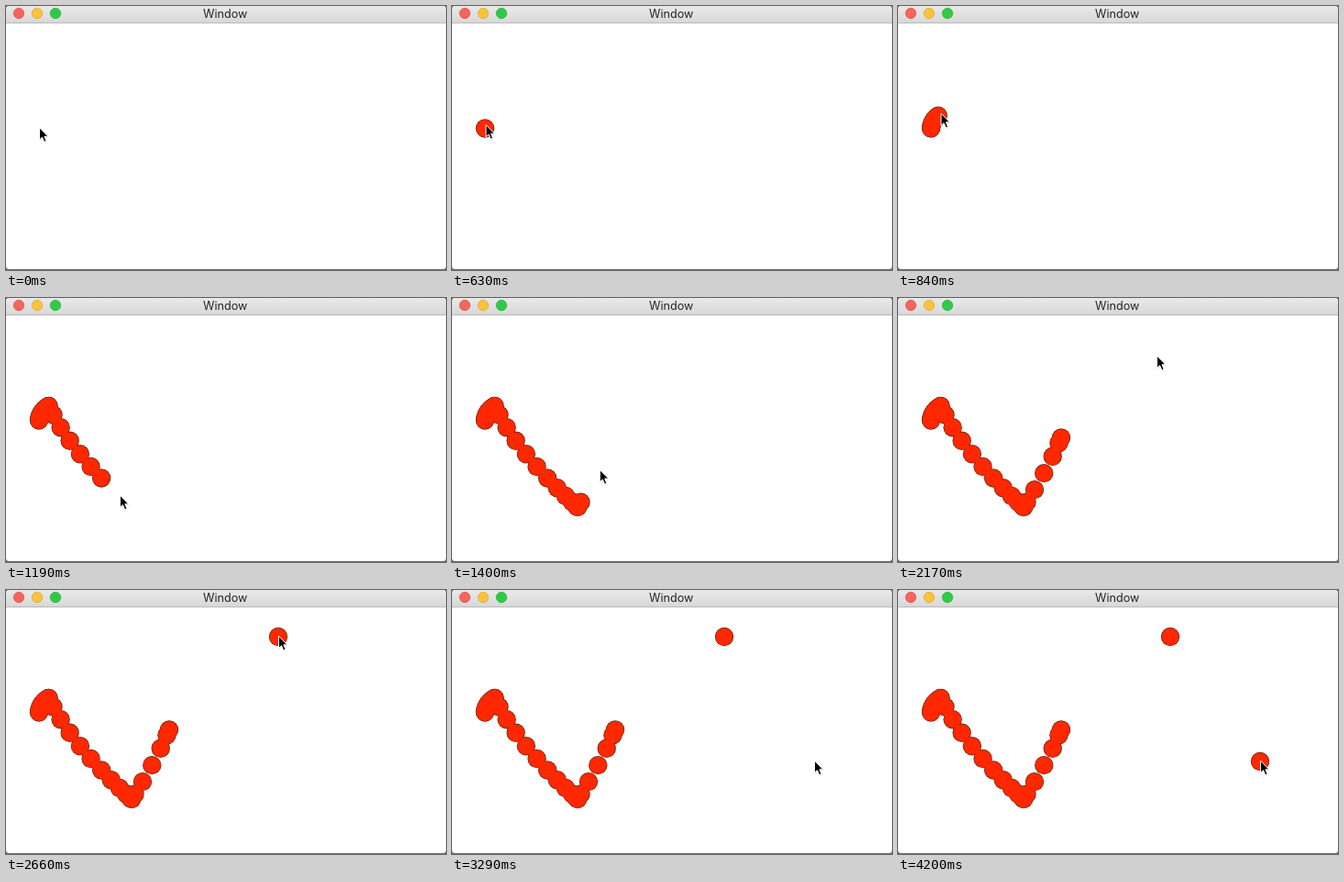
Animation of 480x288 px, one loop 4270 ms. Source, as an HTML page:

```html
<!DOCTYPE html>
<html lang="en">
<head>
<meta charset="utf-8">
<title>Window</title>
<style>
  html, body { margin: 0; width: 100%; height: 100%; overflow: hidden; background: #fff; }
  svg { display: block; width: 480px; height: 288px; }
  .title { font: 12.6px Inter, Roboto, sans-serif; fill: #262626; text-anchor: middle; }
  .rim { fill: #6e2a14; }
  .ink { fill: #ff2800; }
</style>
</head>
<body>
<svg viewBox="0 0 480 288">
  <defs>
    <linearGradient id="bar" x2="0" y2="1">
      <stop offset="0" stop-color="#e9e9e9"/>
      <stop offset="1" stop-color="#d8d8d8"/>
    </linearGradient>
    <clipPath id="frame"><rect width="480" height="287" rx="3.5"/></clipPath>
  </defs>
  <rect width="480" height="288" fill="#707070"/>
  <g clip-path="url(#frame)">
    <rect width="480" height="288" fill="#fff"/>
    <rect width="480" height="18" fill="url(#bar)"/>
    <rect y="18" width="480" height="1" fill="#b9b9b9"/>
  </g>
  <g stroke-width=".8">
    <circle cx="14" cy="8" r="5.7" fill="#f4655e" stroke="#dc5650"/>
    <circle cx="34" cy="8" r="5.7" fill="#fbc23c" stroke="#e0aa3a"/>
    <circle cx="54" cy="8" r="5.7" fill="#2fcb48" stroke="#2fb243"/>
  </g>
  <text class="title" x="239.2" y="13">Window</text>
  <g id="rims" class="rim"></g>
  <g id="inks" class="ink"></g>
  <g id="cursor">
    <path d="M0 0V13.6L3.1 10.8L5.4 16L7.8 15L5.6 9.9H9.7Z" transform="translate(.3 .9)" fill="#000" opacity=".15"/>
    <path d="M0 0V13.2L3 10.5L5.2 15.6L7.5 14.6L5.4 9.6H9.4Z" fill="#000" stroke="#fff" stroke-linejoin="round"/>
  </g>
</svg>
<script>
const LOOP = 4270, STEP = 70, LAG = 40;

// Drags and moves of the pointer; a drag leaves evenly timed dots.
// Each runs along a quadratic curve bent towards its control point.
const moves = [
  { start: 560, end: 840, from: [36, 133.5], bend: [37, 123], to: [46.5, 118], dots: 8 },
  { start: 910, end: 1295, from: [46.5, 118], bend: [72, 170], to: [137, 228], dots: 11, skew: .7 },
  { start: 1295, end: 1495, from: [137, 228], bend: [161, 192], to: [178, 152.5], dots: 6 },
  { start: 1680, end: 2310, from: [178, 152.5], bend: [238, 102], to: [297, 51] },
  { start: 2940, end: 3290, from: [297, 51], bend: [346, 119], to: [395, 187] }
];

const $ = id => document.getElementById(id);
const smooth = k => k * k * (3 - 2 * k);

function along({ from, bend, to, skew = 1 }, k) {
  const u = smooth(k ** skew), v = 1 - u;
  return from.map((a, i) => v * v * a + 2 * u * v * bend[i] + u * u * to[i]);
}

function pointerAt(t) {
  const move = moves.findLast(m => m.start <= t) || moves[0];
  const k = (t - move.start) / (move.end - move.start);
  return along(move, Math.min(1, Math.max(0, k)));
}

function circle(group, [x, y], r) {
  const c = document.createElementNS("http://www.w3.org/2000/svg", "circle");
  c.setAttribute("cx", x);
  c.setAttribute("cy", y);
  c.setAttribute("r", r);
  return $(group).appendChild(c);
}

const marks = [];
function addDot(time, at) {
  marks.push({ time, parts: [circle("rims", at, 10.2), circle("inks", at, 9.4)] });
}

for (const m of moves)
  for (let n = 0; n <= m.dots; n++) {
    const k = n / m.dots;
    addDot(m.start + k * (m.end - m.start) + LAG, along(m, k));
  }
for (const click of [2660, 3500]) addDot(click, pointerAt(click));

function draw() {
  const t = Math.floor(performance.now() % LOOP / STEP) * STEP;
  for (const { time, parts } of marks)
    for (const p of parts) p.style.display = t >= time ? "" : "none";
  const [x, y] = pointerAt(t);
  $("cursor").setAttribute("transform", `translate(${x + .5} ${y - .8})`);
  requestAnimationFrame(draw);
}
draw();
</script>
</body>
</html>
```
